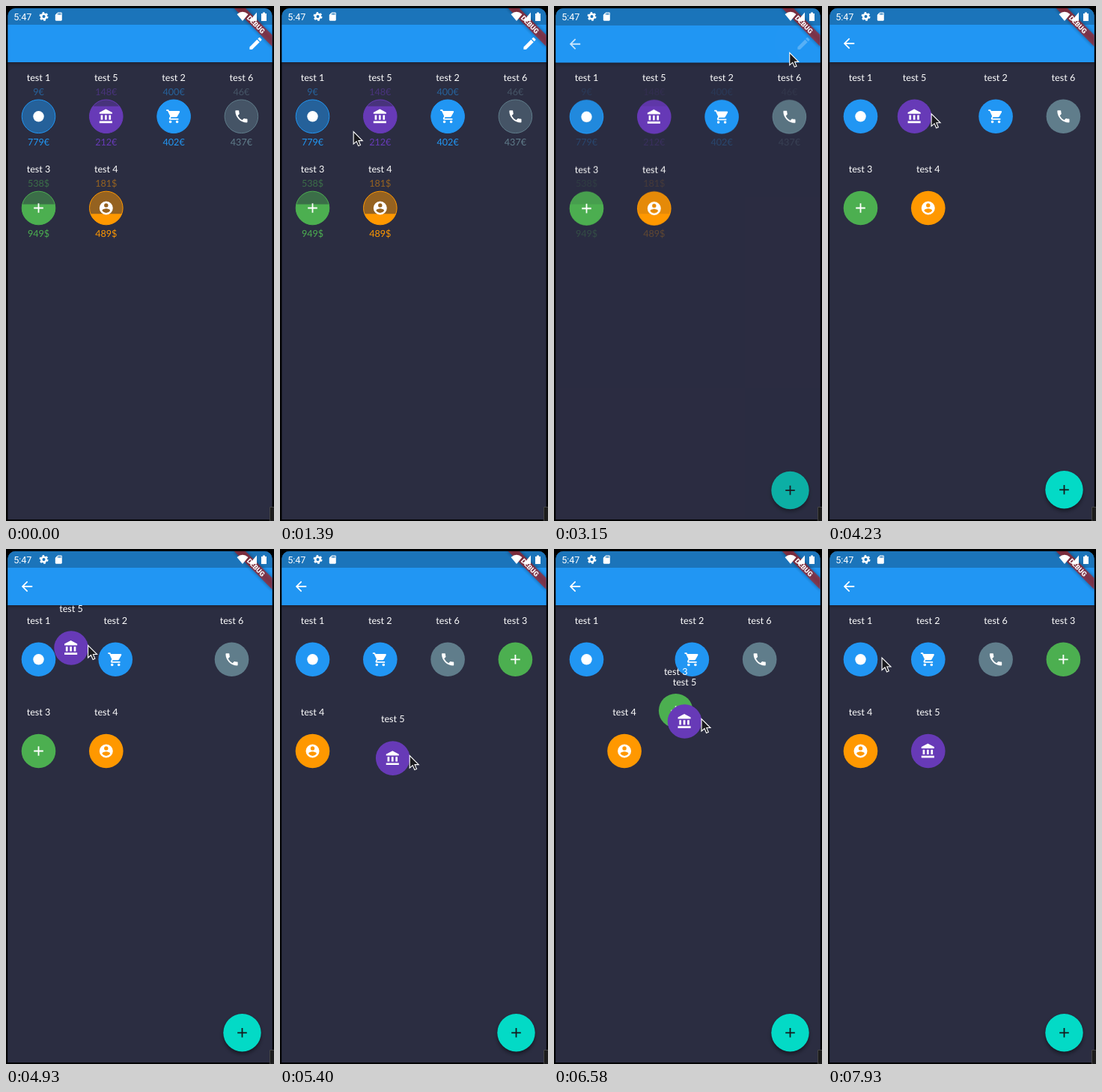
Animation, 358 px wide and 687 px high, one loop 8 s. Source, as an HTML page:

```html
<!DOCTYPE html>
<html lang="en">
<head>
<meta charset="utf-8">
<title>Reorder grid</title>
<style>
html, body { margin: 0; width: 100%; height: 100%; overflow: hidden; background: #000; }
svg { display: block; width: 358px; height: 687px; }
text { font: 12.6px Lato, sans-serif; text-anchor: middle; text-rendering: geometricPrecision; }
.sys { font-family: Roboto, sans-serif; }
.flag { font: 900 9.2px Roboto, sans-serif; }
</style>
</head>
<body>
<svg viewBox="0 0 358 687">
  <defs>
    <clipPath id="screen"><path d="M2.4 685V13a10 10 0 0 1 10-10H345.6a10 10 0 0 1 10 10V685Z"/></clipPath>
    <clipPath id="bar"><path d="M0 25H358V75H0Z"/></clipPath>
    <filter id="soft" x="-30%" y="-30%" width="160%" height="160%"><feGaussianBlur stdDeviation="2.5"/></filter>
    <g id="page">
      <path d="M0 3H358V685H0Z" fill="#2b2d41"/>
      <path d="M0 60H358V76H0Z" filter="url(#soft)" opacity=".4"/>
      <path d="M0 25H358V75H0Z" fill="#2196f3"/>
      <path d="M0 3H358V25H0Z" fill="#1b74ba"/>
    </g>
  </defs>
  <g clip-path="url(#screen)">
    <g id="home">
      <use href="#page"/>
      <circle id="ripple" cx="332" cy="50" fill="#fff" clip-path="url(#bar)"/>
    </g>
    <g id="edit">
      <use href="#page"/>
      <g id="fab">
        <circle cx="315.5" cy="648.5" r="25" opacity=".45" filter="url(#soft)"/>
        <circle cx="315.5" cy="645.3" r="25.2" fill="#03dac6"/>
      </g>
    </g>
    <g transform="translate(355.6 3) rotate(45)">
      <path d="M-36 25.2H36V36H-36Z" filter="url(#soft)" opacity=".4"/>
      <path d="M-36 25.2H36V36H-36Z" fill="#b71c1c" fill-opacity=".63"/>
      <text class="flag" y="33.9" fill="#fff">DEBUG</text>
    </g>
  </g>
  <g id="status" fill="#fff">
    <text class="sys" x="22.3" y="19">5:47</text>
    <g fill="none" stroke="#fff">
      <circle cx="50.5" cy="14" r="3.3" stroke-width="2.6"/>
      <circle cx="50.5" cy="14" r="5" stroke-width="2" stroke-dasharray="2.6 2.636"/>
    </g>
    <path d="M308.5 11Q316 4.5 323.5 11L316 20Z"/>
    <path d="M335 8.5V20H325Z"/>
    <path d="M341 10H343V8.5H346V10H348V20H341Z"/>
  </g>
  <path d="M352.5 668.5H360V690H352.5Z" fill="#1c1c1c" stroke="#444"/>
  <path id="cursor" d="M0 0V16.5L4 13L6.6 19L9.3 17.8L6.8 12H12Z" fill="#1b1b1f" stroke="#fff" stroke-width="1.1"/>
</svg>
<script>
const $ = id => document.getElementById(id);
const add = (id, markup) => $(id).insertAdjacentHTML('beforeend', markup);
const place = (id, [x, y]) => $(id).setAttribute('transform', `translate(${x} ${y})`);
const clamp = v => Math.max(0, Math.min(1, v));

// Shapes on a 24-unit grid
const box = (x, y, w, h) => `M${x} ${y}h${w}v${h}h${-w}z`;
const disc = (x, y, r) => `M${x - r} ${y}a${r} ${r} 0 0 1 ${2 * r} 0a${r} ${r} 0 0 1 ${-2 * r} 0z`;
const icons = {
  pencil: 'M3 17.25V21h3.75L17.81 9.94l-3.75-3.75zM20.71 7.04c.39-.39.39-1.02 0-1.41l-2.34-2.34c-.39-.39-1.02-.39-1.41 0l-1.83 1.83 3.75 3.75z',
  back: 'M20 11H7.83l5.59-5.59L12 4l-8 8 8 8 1.41-1.41L7.83 13H20z',
  dot: disc(12, 12, 8),
  bank: [4, 10, 16].map(x => box(x, 10, 3, 7)).join('') + box(2, 19, 19, 3) + 'M11.5 1L2 6v2h19V6z',
  cart: disc(7, 20, 2) + disc(17, 20, 2) +
    'M1 2v2h2l3.6 7.59-1.35 2.45C4.5 15.4 5.5 17 7 17h12v-2H7.42l-.22-.37.9-1.63h7.45q1.2 0 1.75-1.03l3.58-6.49Q21.4 4.2 20 4H5.21l-.94-2z',
  phone: 'M6.62 10.79q2.2 4.4 6.59 6.59l2.2-2.2q.5-.45 1.02-.24 1.7.57 3.57.57 1 0 1 1V20q0 1-1 1A17 17 0 0 1 3 4q0-1 1-1h3.5q1 0 1 1 0 1.9.57 3.57.15.6-.25 1.02z',
  plus: 'M19 13h-6v6h-2v-6H5v-2h6V5h2v6h6z',
  person: disc(12, 12, 10) + disc(12, 8, 3) + 'M12 19.2q-3.8 0-6-3.22c.03-1.99 4-3.08 6-3.08s5.97 1.09 6 3.08q-2.2 3.22-6 3.22z',
  card: 'M18 2h-8L4 8v12q0 2 2 2h12q2 0 2-2V4q0-2-2-2z' + [10, 13, 16].map(x => box(x, 4, 2, 4)).join('')
};
const icon = (name, x = 0, y = 0, size = 21.6, fill = '#fff') =>
  `<path d="${icons[name]}" fill="${fill}" fill-rule="evenodd" transform="translate(${x} ${y}) scale(${size / 24}) translate(-12 -12)"/>`;

const slot = i => [43.5 + 90.3 * (i % 4), i < 4 ? 147.3 : 269.5];

// Items that make room, in order, and the one that is dragged
const row = [
  { n: 1, color: '#2196f3', icon: 'dot', unit: '€', spent: 9, total: 779 },
  { n: 2, color: '#2196f3', icon: 'cart', unit: '€', spent: 400, total: 402 },
  { n: 6, color: '#607d8b', icon: 'phone', unit: '€', spent: 46, total: 437 },
  { n: 3, color: '#4caf50', icon: 'plus', unit: '$', spent: 538, total: 949 },
  { n: 4, color: '#ff9800', icon: 'person', unit: '$', spent: 181, total: 489 }
];
const dragged = { n: 5, color: '#673ab7', icon: 'bank', unit: '€', spent: 148, total: 212 };

// The free slot and when it starts to move there
const gaps = [[0, 1], [4764, 2], [4908, 3], [5150, 5], [5600, 3], [6080, 1], [6497, 5]];
const slotFor = (rank, gap) => slot(rank + (rank >= gap));

function rowPosition(rank, t) {
  let [x, y] = slotFor(rank, gaps[0][1]);
  for (let i = 1; i < gaps.length; i++) {
    const k = clamp((t - gaps[i][0]) / 200);
    const from = slotFor(rank, gaps[i - 1][1]), to = slotFor(rank, gaps[i][1]);
    x += k * (to[0] - from[0]);
    y += k * (to[1] - from[1]);
  }
  return [x, y];
}

// Smooth path through [time, x, y] points that never overshoots them
function along(points, t) {
  const next = points.findIndex(p => p[0] > t);
  if (next < 0) return points.at(-1).slice(1);
  if (next === 0) return points[0].slice(1);
  const slope = (i, j) => {
    const a = points[i - 1], b = points[i], c = points[i + 1];
    return a && c && (b[j] - a[j]) * (c[j] - b[j]) > 0 ? (c[j] - a[j]) / (c[0] - a[0]) : 0;
  };
  const a = points[next - 1], b = points[next];
  const span = b[0] - a[0], k = (t - a[0]) / span;
  return [1, 2].map(j =>
    a[j] + (b[j] - a[j]) * k * k * (3 - 2 * k) +
    span * k * (1 - k) * (slope(next - 1, j) * (1 - k) - slope(next, j) * k));
}

const drop = 7200;
const drag = [
  [4160, ...slot(1)], [4230, 115.6, 147.3], [4600, 69, 136], [4936, 87, 132], [5450, 160, 282],
  [5957, 321.5, 114], [6300, 150, 140], [6585, 174.5, 230], [6820, 187, 251], [7070, 161, 260], [7150, 161, 260]
];
const pointer = [
  [590, 114, 87], [840, 62, 38], [1070, 62, 38], [1400, 120, 187], [1870, 318, 64],
  [2120, 331, 54], [3050, 331, 54], [3480, 156.3, 143.8],
  ...drag.map(([t, x, y]) => [t, x + 22.5, y - 3.5]),
  [7915, 72, 145]
];

const R = 22.3;
const label = n => `<text y="-47.7" fill="#fff">test ${n}</text>`;

function addItem(it, [x, y]) {
  const { n, color, unit, spent, total } = it;
  const fill = clamp(.5 + 1.45 * (spent / total - .49));
  const level = R * (1 - 2 * Math.min(fill, .999));
  const half = Math.sqrt(R * R - level * level);
  add('home', `<g transform="translate(${x} ${y})" fill="${color}">${label(n)}
    <text y="-28.8" opacity=".5">${spent + unit}</text>
    <circle r="${R}" fill-opacity=".5" stroke="${color}"/>
    <path d="M${-half} ${level}A${R} ${R} 0 ${+(level < 0)} 0 ${half} ${level}Z"/>
    ${icon(it.icon)}<text y="38.3">${total + unit}</text></g>`);
  add('edit', `<g id="item${n}">${label(n)}<circle r="22.8" fill="${color}"/>${icon(it.icon)}</g>`);
}
row.forEach((it, rank) => addItem(it, rowPosition(rank, 0)));
add('home', icon('pencil', 333.5, 50));
add('edit', icon('back', 28, 50));
addItem(dragged, slot(1));
add('fab', icon('plus', 315.5, 645.3, 21.6, '#151a1c'));
add('status', icon('card', 70.3, 14, 13.5));

function draw(t) {
  const press = t - 2735;
  $('ripple').setAttribute('r', press < 0 ? 0 : 29 + Math.min(press, 300) * .03);
  $('ripple').setAttribute('opacity', .1 * clamp((430 - press) / 250));

  const shown = clamp((t - 2880) / 300);
  place('edit', [0, 170 * (1 - shown) ** 3]);
  $('edit').setAttribute('opacity', shown ** 1.6);

  row.forEach(({ n }, rank) => place('item' + n, rowPosition(rank, t)));
  place('item5', t < drop ? along(drag, t) : slot(5));
  place('cursor', along(pointer, t));
  $('cursor').setAttribute('visibility', t < 590 ? 'hidden' : 'visible');
}

// The picture is refreshed in even steps, like a screen recording
const step = 78.5;
const refresh = t => 4230 + Math.floor((t - 4219) / step) * step;

const began = performance.now();
function tick() {
  draw(refresh((performance.now() - began) % 8000));
  requestAnimationFrame(tick);
}
tick();
</script>
</body>
</html>
```
